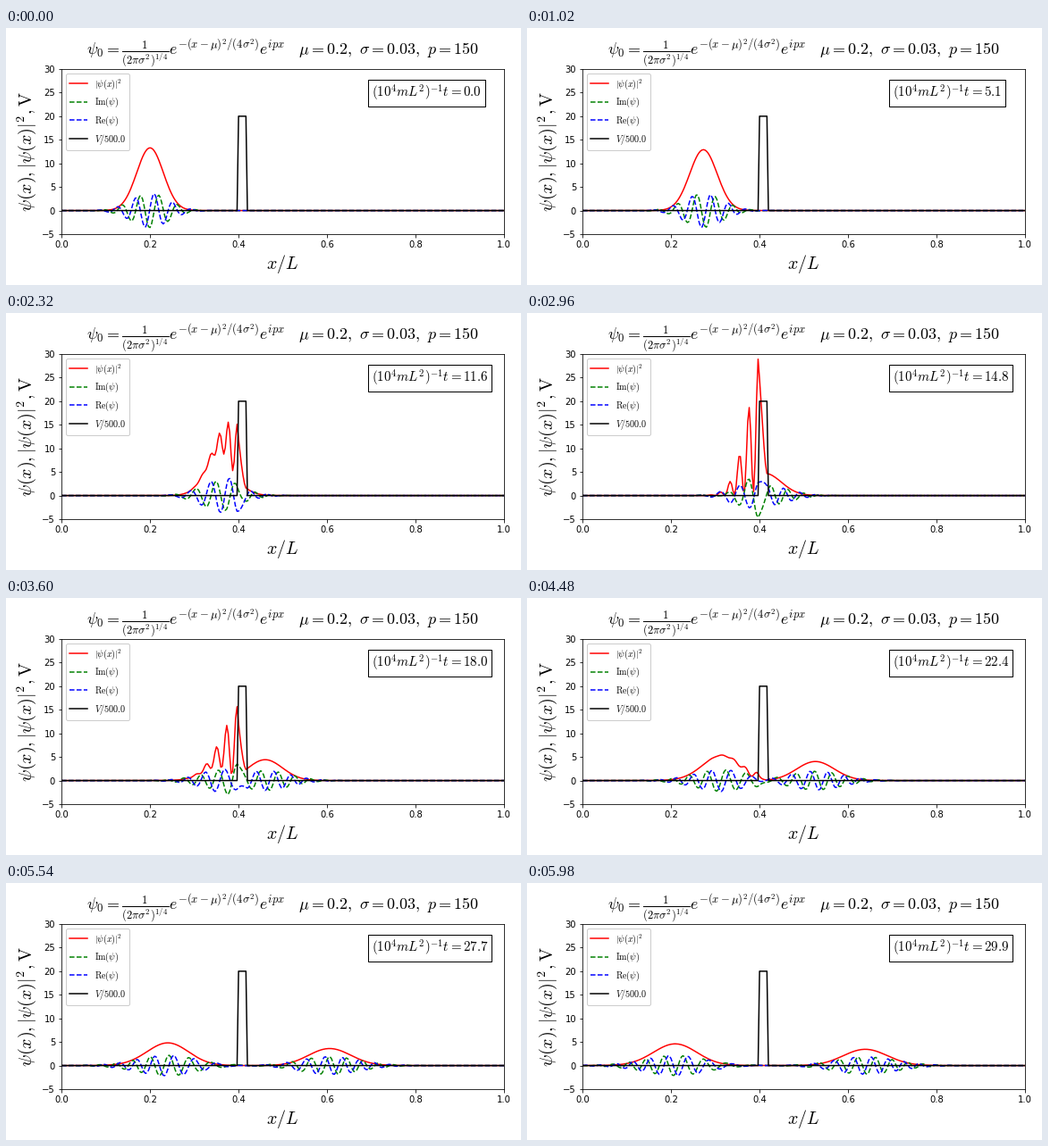
Write a matplotlib script that moves like this. It is 576x288 px and loops after 6000 ms.

```python
import numpy as np
import matplotlib.pyplot as plt
from matplotlib.animation import FuncAnimation
from matplotlib.patches import FancyBboxPatch, Rectangle
from matplotlib.transforms import Affine2D

W, H = 576, 288
FRAMES, INTERVAL = 300, 20
DT = 1e-5
MU, SIGMA, P = 0.2, 0.03, 150
V0, V_SCALE = 10000.0, 500.0

plt.rcParams["mathtext.fontset"] = "cm"

# Finite-difference Hamiltonian on the unit interval, walls at both ends
N = 300
x = np.linspace(0, 1, N + 1)
dx = 1 / N
V = np.where((x > 0.398) & (x < 0.418), V0, 0.0)
hop = np.full(N - 2, -0.5 / dx**2)
ham = np.diag(1 / dx**2 + V[1:-1]) + np.diag(hop, 1) + np.diag(hop, -1)
energy, modes = np.linalg.eigh(ham)

psi0 = np.exp(-(x - MU)**2 / (4 * SIGMA**2) + 1j * P * x)
psi0 /= (2 * np.pi * SIGMA**2) ** 0.25
coeffs = modes.T @ psi0[1:-1]


def wave(t):
    psi = np.zeros(N + 1, complex)
    psi[1:-1] = modes @ (coeffs * np.exp(-1j * energy * t))
    return psi


fig = plt.figure(figsize=(W / 72, H / 72), dpi=72, facecolor="white")
left, right, top, bottom = 62.1, 557.1, 46.0, 231.0
ax = fig.add_axes([left / W, 1 - bottom / H,
                   (right - left) / W, (bottom - top) / H])
ax.set_xlim(0, 1)
ax.set_ylim(-5, 30)
ax.set_xticks(np.arange(6) / 5)
ax.set_yticks(range(-5, 31, 5))

# Stage pixels, y pointing down
px = Affine2D().scale(1 / W, -1 / H).translate(0, 1) + fig.transFigure


def put(x, y, s, size, **kw):
    kw = {"va": "baseline", "zorder": 8, "transform": px, **kw}
    return ax.text(x, y, s, fontsize=size, **kw)


styles = [
    ("red", "-", r"$|\psi(x)|^2$"),
    ("green", "--", r"$\mathrm{Im}(\psi)$"),
    ("blue", "--", r"$\mathrm{Re}(\psi)$"),
    ("black", "-", rf"$V/{V_SCALE}$"),
]
curves = [ax.plot(x, V / V_SCALE, ls, color=c, lw=1.5)[0] for c, ls, _ in styles]

# Titles and axis labels
put((left + right) / 2, 30,
    r"$\psi_0 = \frac{1}{(2\pi\sigma^2)^{1/4}}"
    r"e^{-(x-\mu)^2/(4\sigma^2)}e^{ipx}"
    r"\quad\mu=0.2,\ \sigma=0.03,\ p=150$", 18, ha="center")
put((left + right) / 2, 270, r"$x/L$", 20, ha="center")
put(29, (top + bottom) / 2, r"$\psi(x),|\psi(x)|^2,\mathrm{V}$", 20,
    ha="center", rotation=90, rotation_mode="anchor")

# Legend
ax.add_patch(FancyBboxPatch((67.1, 51.2), 71, 86.1, transform=px, zorder=6,
                            boxstyle="round,pad=0,rounding_size=2", snap=True,
                            fc=(1, 1, 1, 0.8), ec="0.8", lw=1))
for i, (color, ls, name) in enumerate(styles):
    y = 62.1 + 20.65 * i
    ax.add_line(plt.Line2D([71.1, 91.1], [y, y], color=color, ls=ls, lw=1.5,
                           transform=px, zorder=7))
    put(99.1, y + 3.6, name, 10)

# Clock
clock = put(0.7, 24, "", 15, transform=ax.transData)
box_x = left + 0.7 * (right - left) - 4
box = ax.add_patch(Rectangle((box_x, 58.4), 131, 30, transform=px, zorder=6,
                             fc="white", ec="black", lw=1))


def update(frame):
    psi = wave(frame * DT)
    for curve, y in zip(curves, (np.abs(psi)**2, psi.imag, psi.real)):
        curve.set_ydata(y)
    clock.set_text(rf"$(10^4mL^2)^{{-1}}t={frame / 10:.1f}$")
    box.set_width(clock.get_window_extent().width * 72 / fig.dpi + 8)
    return [*curves, box, clock]


anim = FuncAnimation(fig, update, frames=FRAMES, interval=INTERVAL,
                     repeat=True, repeat_delay=0, blit=False)
plt.show()
```
